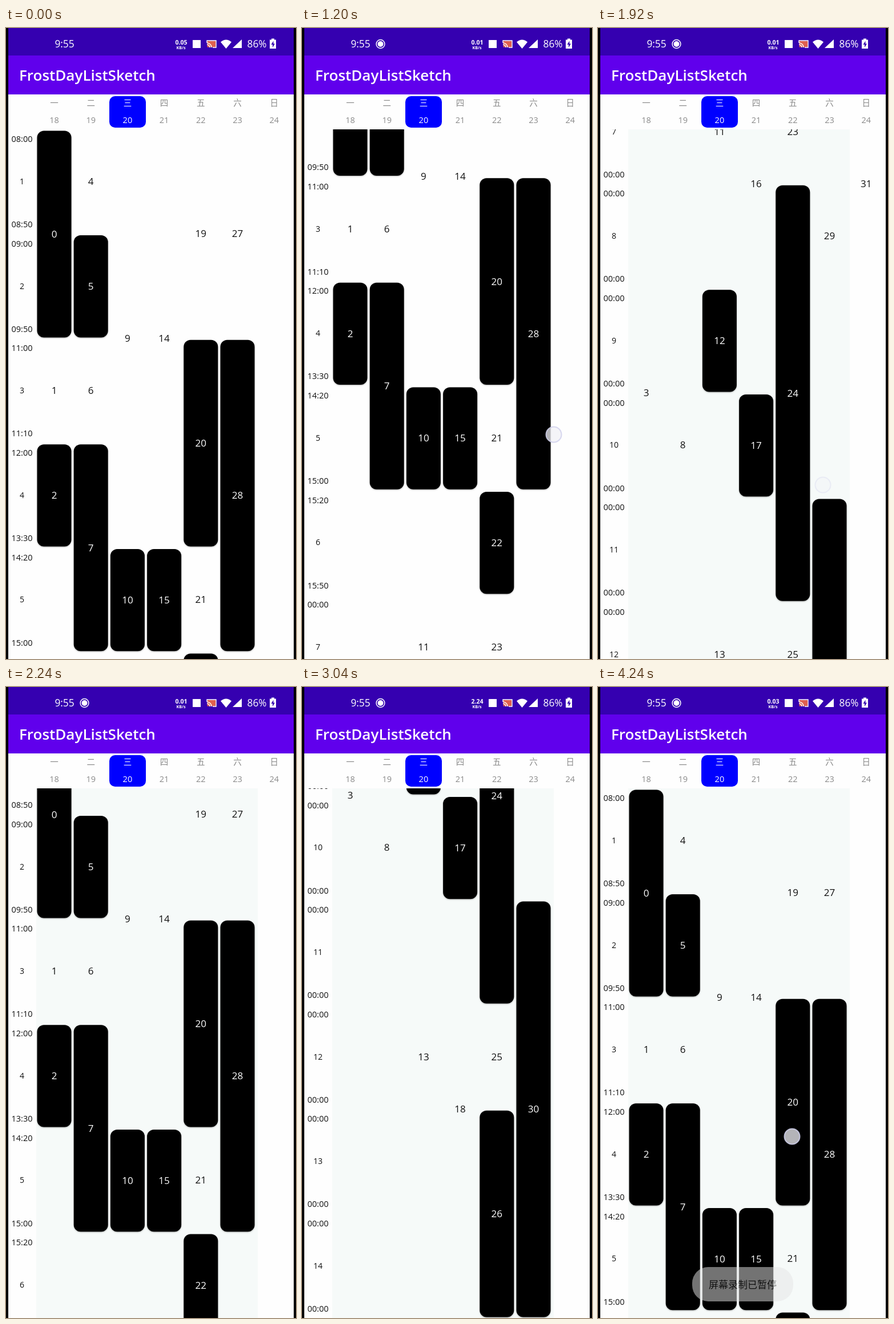
An HTML page that plays this animation: 508 px wide and 1102 px high, repeating every 4320 ms.

```html
<!DOCTYPE html>
<html lang="zh">
<head>
<meta charset="utf-8">
<title>Timetable</title>
<style>
  html, body { margin: 0; width: 100%; height: 100%; overflow: hidden; background: #000; }
  svg { display: block; width: 100vw; height: 100vh; }
  text { font-family: "Open Sans", "Noto Sans CJK SC", "Noto Sans CJK", sans-serif; }
</style>
</head>
<body>
<svg id="stage" viewBox="0 0 508 1102">
  <defs>
    <clipPath id="view"><rect x="4" y="177" width="500" height="925"/></clipPath>
    <filter id="shade" x="-10%" y="-5%" width="120%" height="110%">
      <feDropShadow dx="0" dy="1" stdDeviation="1" flood-opacity=".3"/>
    </filter>
  </defs>
  <rect x="4" width="500" height="1102" fill="#fefefe"/>
  <rect x="4" width="500" height="48" fill="#3500b0"/>
  <rect x="4" y="48" width="500" height="68" fill="#6000ec"/>
  <text x="23" y="92" font-size="26" font-weight="600" fill="#fff">FrostDayListSketch</text>

  <g id="status" fill="#fff">
    <g id="record">
      <circle cx="137.5" cy="28" r="7.4" fill="none" stroke="#fff" stroke-width="1.5"/>
      <circle cx="137.5" cy="28" r="5"/>
    </g>
    <rect x="327" y="21" width="14" height="14"/>
    <rect x="352.5" y="22.5" width="15" height="11" fill="#e0604f"/>
    <path d="M352 26v-4h16v12h-6M352 29a5 5 0 0 1 5 5M352 26a8 8 0 0 1 8 8" fill="none" stroke="#fff" stroke-width="1.4"/>
    <path d="M376 24.5q9.500-8 19 0L385.500 36z"/>
    <path d="M413 20v15h-16z"/>
    <path d="M465 18.500h5v2h3v15.500h-11v-15.500h3z"/>
    <path d="M468.500 22.500l-4 6.500h2.500v5l4-6.500h-2.500z" fill="#3500b0"/>
  </g>

  <g id="head"><rect x="181" y="119" width="64" height="55" rx="10" fill="#00f"/></g>
  <g clip-path="url(#view)">
    <rect id="tint" x="53" y="177" width="388" height="925" fill="#f6faf9"/>
    <g id="grid"></g>
  </g>

  <circle id="touch" r="13.500" fill="#f0f0f5" fill-opacity=".75" stroke="#d0d0ec" stroke-opacity=".85" stroke-width="2"/>
  <g id="toast">
    <rect x="165" y="1013" width="177" height="60" rx="28" fill="#e6e6e6"/>
  </g>
</svg>
<script>
const LOOP = 4320, STEP = 80, ROW = 182.6, COL = 64.2;
const $ = id => document.getElementById(id);

function add(parent, tag, attrs) {
  const el = document.createElementNS("http://www.w3.org/2000/svg", tag);
  for (const k in attrs) el.setAttribute(k, attrs[k]);
  return $(parent).appendChild(el);
}

// Text centred on (x, y)
function label(parent, str, x, y, size, fill, weight = 400) {
  const el = add(parent, "text", {
    x, y: y + size * 0.357, "font-size": size, fill,
    "font-weight": weight, "text-anchor": "middle"
  });
  el.textContent = str;
  return el;
}

const colX = c => 84.5 + c * COL;

label("status", "9:55", 102.5, 28, 17.3, "#fff");
label("status", "86%", 439.5, 28, 17.3, "#fff");
label("status", "KB/s", 306.5, 34, 7.2, "#fff", 700);
const rate = label("status", "", 307, 25, 10.5, "#fff", 700);
label("toast", "屏幕录制已暂停", 253.5, 1043.5, 17, "#222");

[..."一二三四五六日"].forEach((day, c) => {
  const fill = c === 2 ? "#fff" : "#8a8a8a";
  label("head", day, colX(c), 131, 14.5, fill);
  label("head", 18 + c, colX(c), 161, 14.5, fill);
});

const hours = ["08:00 08:50", "09:00 09:50", "11:00 11:10", "12:00 13:30", "14:20 15:00", "15:20 15:50"];
for (let r = 0; r < 14; r++) {
  const [from, to] = (hours[r] || "00:00 00:00").split(" ");
  const y = r * ROW;
  label("grid", from, 28, y + 194, 14.5, "#111");
  label("grid", r + 1, 28, y + 268, 14, "#111");
  label("grid", to, 28, y + 343, 14.5, "#111");
}

// Per column: [middle row, rows filled]; no second value means text only
const lessons = [
  [[0.5, 2], [2], [3, 1], [8.5]],
  [[0], [1, 1], [2], [3.5, 2], [9]],
  [[1.5], [4, 1], [6], [8, 1], [11]],
  [[1.5], [4, 1], [6.5], [9, 1], [11.5]],
  [[0.5], [2.5, 2], [4], [5, 1], [6], [8.5, 4], [11], [12.5, 2]],
  [[0.5], [3, 3], [7], [11.5, 4]],
  [[6.5]]
];
let id = 0;
lessons.forEach((list, c) => list.forEach(([mid, len]) => {
  const y = 268 + mid * ROW;
  if (len) add("grid", "rect", {
    x: colX(c) - 30, y: 179.5 + (mid + 0.5 - len / 2) * ROW,
    width: 60, height: len * ROW - 4.3, rx: 12, filter: "url(#shade)"
  });
  label("grid", id++, colX(c), y + (len ? 0.5 : 0), 17, len ? "#fff" : "#111");
}));

// Keys are [ms, value]
const scroll = [
  [1120, 0], [1200, 282.5], [1280, 775], [1360, 1113], [1440, 1451], [1520, 1631],
  [1840, 1631], [1920, 1183], [2000, 830], [2080, 560], [2160, 320], [2240, 137],
  [2320, 35], [2400, 0], [2560, 0], [2640, 285], [2720, 780], [2800, 1130],
  [2880, 1460], [2960, 1600], [3040, 1631], [3120, 1631], [3200, 1190],
  [3280, 690], [3360, 240], [3440, 10], [3520, 0]
];
const rates = [[0, "0.05"], [640, "0.01"], [2640, "2.24"], [3920, "0.03"]];
// [ms, x, y, opacity], each shown for one step
const touches = [
  [1120, 441, 938, 1], [1200, 441, 710, 1],
  [1840, 394, 560, 1], [1920, 394, 798, 0.4],
  [2560, 441, 930, 1], [2640, 441, 715, 1],
  [3120, 394, 560, 1], [3200, 394, 795, 0.4],
  [4160, 340, 785, 0.6], [4240, 340, 785, 1]
];

function tween(keys, t) {
  const n = keys.findIndex(k => k[0] > t);
  if (n === 0) return keys[0][1];
  if (n < 0) return keys[keys.length - 1][1];
  const [t0, a] = keys[n - 1], [t1, b] = keys[n];
  return a + (b - a) * (t - t0) / (t1 - t0);
}

const show = (el, opacity) => $(el).setAttribute("opacity", opacity);

function draw(now) {
  const t = Math.floor(now % LOOP / STEP) * STEP;
  $("grid").setAttribute("transform", `translate(0 ${-tween(scroll, t)})`);
  rate.textContent = rates.filter(r => r[0] <= t).pop()[1];
  show("record", t >= 320 ? 1 : 0);
  show("tint", t >= 1280 ? 1 : 0);
  show("toast", tween([[4080, 0], [4240, 0.5]], t));

  const [, x, y, alpha] = touches.find(p => p[0] === t) || [0, 0, 0, 0];
  $("touch").setAttribute("transform", `translate(${x} ${y})`);
  show("touch", alpha);
}

const start = performance.now();
function tick() {
  draw(performance.now() - start);
  requestAnimationFrame(tick);
}
tick();
</script>
</body>
</html>
```
